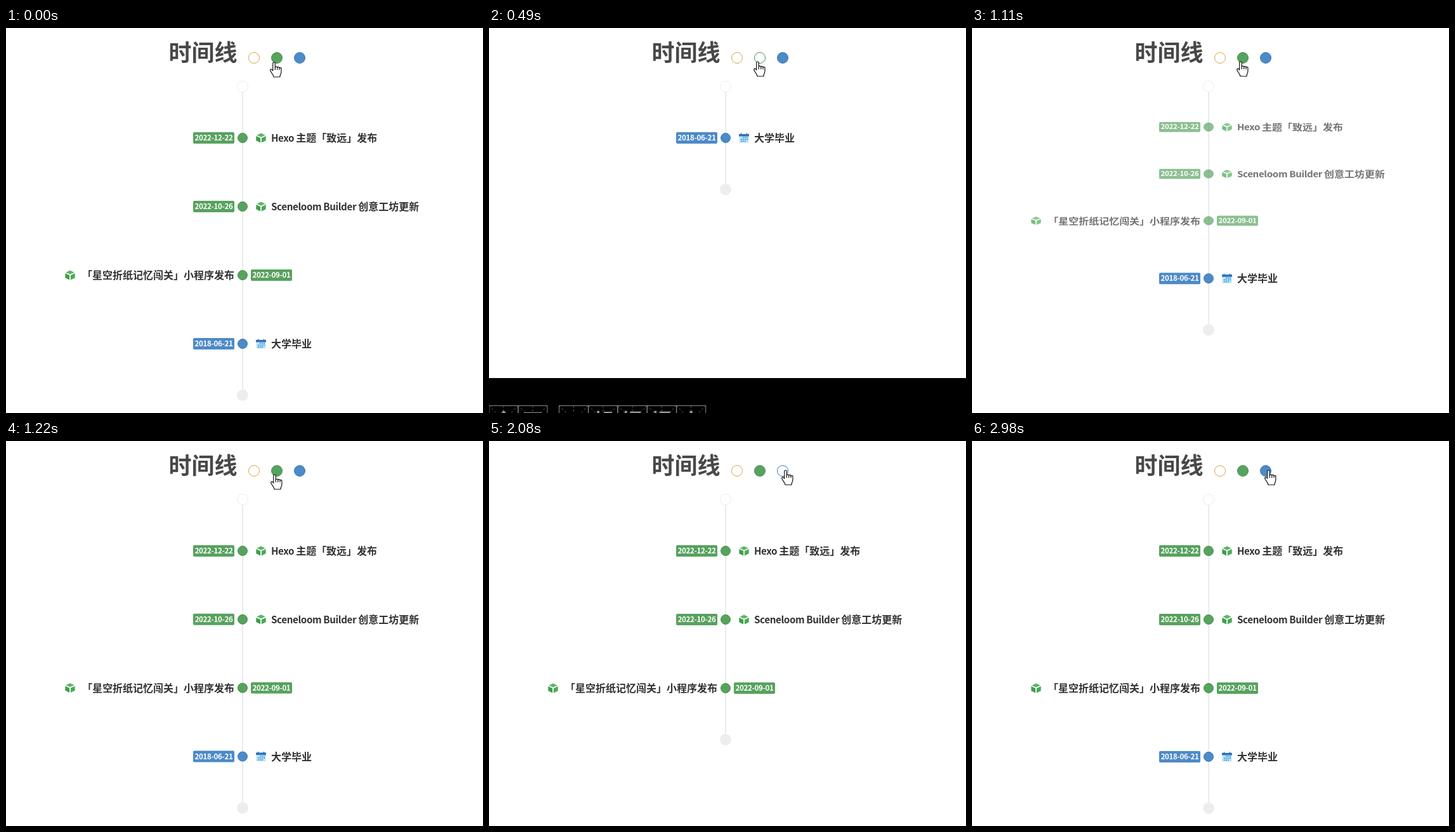
Write an HTML page that moves like this. It is 752 px wide and 606 px high and loops after 3.24 s.

```html
<!DOCTYPE html>
<html lang="zh-CN">
<head>
<meta charset="utf-8">
<style>
html, body { margin: 0; width: 100%; height: 100%; overflow: hidden; background: #fff; }
svg { display: block; }
text { font-family: "Noto Sans CJK SC", "Noto Sans CJK", "Noto Sans", sans-serif; font-weight: 700; white-space: pre; }
.label { font-size: 16px; fill: #333; }
.latin { font-size: 15.2px; letter-spacing: -.4px; }
.date { font-size: 11.6px; letter-spacing: -.35px; fill: #fff; text-anchor: middle; }
</style>
</head>
<body>
<svg id="stage" width="752" height="606" viewBox="0 0 752 606"></svg>
<script>
const LOOP = 3240, ROW = 108, TOP = 119, FADE = 200;
const GREEN = '#58a25f', BLUE = '#4d8ac8';
const GREEN_EDGE = '#3f9148', BLUE_EDGE = '#3878bb';

const items = [
  { kind: 'green', date: '2022-12-22', latin: 'Hexo ', text: '主题「致远」发布' },
  { kind: 'green', date: '2022-10-26', latin: 'Sceneloom Builder ', text: '创意工坊更新' },
  { kind: 'green', date: '2022-09-01', latin: '', text: '「星空折纸记忆闯关」小程序发布', left: true },
  { kind: 'blue', date: '2018-06-21', latin: '', text: '大学毕业' }
];

// Icons are centred on their own origin.
const cube = `
  <path d="M0-7.500 6.800-4.300 0-1.300-6.800-4.300z" fill="#5fb567"/>
  <path d="M-7.700-2.900V4.200L-.900 7.500V.200z" fill="#3f9e4b"/>
  <path d="M7.700-2.900V4.200L.900 7.500V.200z" fill="#4aa956"/>`;

const days = [-1, 2, 5].flatMap((y, r) => [-5, -2, 1, 4]
  .filter((x, c) => !(r == 0 && c == 0 || r == 2 && c == 3))
  .map(x => `<rect x="${x}" y="${y - .5}" width="1.8" height="1.6" fill="#3686c9"/>`)).join('');
const calendar = `
  <rect x="-7.5" y="-6" width="15" height="13.5" rx="1" fill="#b9e6fa"/>
  <path d="M-8-6H8V-2.5H-8z" fill="#2b70bd"/>
  <path d="M-4.5-7.5V-5M4.5-7.5V-5" stroke="#2b70bd" stroke-width="1.5"/>${days}`;

function itemMarkup({ kind, date, latin, text, left }) {
  const green = kind == 'green', color = green ? GREEN : BLUE;
  const badge = left ? 386 : 295;
  return `<g class="item">
    <rect x="${badge}" y="-9" width="65" height="18" rx="2" fill="${color}"/>
    <text class="date" x="${badge + 32.5}" y="4">${date}</text>
    <circle cx="373" r="7.5" fill="${color}" stroke="${green ? GREEN_EDGE : BLUE_EDGE}"/>
    <g transform="translate(${left ? 101 : 402})">${green ? cube : calendar}</g>
    <text class="label" x="${left ? 360 : 418}" y="6" text-anchor="${left ? 'end' : 'start'}"><tspan class="latin">${latin}</tspan>${text}</text>
  </g>`;
}

// Practice squares at the top of the footer.
const square = (x, char) => `<g transform="translate(${x} 43.5)">
  <rect width="46" height="46" fill="none" stroke="#8a8a8a"/>
  <path d="M0 0 46 46M46 0 0 46M23 0V46" stroke="#666" stroke-dasharray="3 3" fill="none"/>
  <text x="23" y="37" font-size="34" text-anchor="middle" fill="#999">${char}</text></g>`;
const footer = [...'今天'].map((c, i) => square(i * 46, c)).join('') +
  [...'一起慢慢走'].map((c, i) => square(110.5 + i * 46.3, c)).join('');

const stage = document.getElementById('stage');
stage.innerHTML = `
  <text x="256.5" y="52" font-size="36" fill="#484848">时间线</text>
  <circle cx="391" cy="47" r="8.5" fill="#fff" stroke="#dfa24c"/>
  <circle id="green" cx="427" cy="47" r="8.5" stroke="${GREEN_EDGE}"/>
  <circle id="blue" cx="463" cy="47" r="8.5" stroke="${BLUE_EDGE}"/>
  <path id="line" stroke="#ebebeb" stroke-width="2"/>
  <circle cx="373" cy="92" r="8.5" fill="#fff" stroke="#ededed"/>
  <circle id="end" cx="373" r="9" fill="#ededed"/>
  ${items.map(itemMarkup).join('')}
  <g id="footer"><rect width="752" height="700"/>${footer}</g>
  <circle id="press" r="13" fill="#ff0" fill-opacity=".55"/>
  <g id="cursor" fill="#fff" stroke="#111" stroke-width="1.2" stroke-linejoin="round">
    <path d="M-1.8 13V1.8a1.8 1.8 0 0 1 3.6 0V8a1.75 1.75 0 0 1 3.4.6a1.7 1.7 0 0 1 3.3.8a1.5 1.5 0 0 1 2.9.9V15c0 3.5-2 4-2 8H-.5c0-3-3.8-6-5.2-10c-.7-2 1.6-2.8 2.6-1.4z"/>
    <path d="M1.8 8V12M5.2 8.6V12M8.5 9.4V12" fill="none"/>
  </g>`;

const $ = id => document.getElementById(id);
const set = (el, attrs) => { for (const k in attrs) el.setAttribute(k, attrs[k]); };
const clamp = x => Math.min(1, Math.max(0, x));
const between = (t, a, b) => t >= a && t < b;
const rows = [...document.querySelectorAll('.item')];

// The standard CSS "ease" curve.
function ease(x) {
  let lo = 0, hi = 1;
  const curve = (u, a, b) => 3 * u * (1 - u) ** 2 * a + 3 * u * u * (1 - u) * b + u ** 3;
  for (let i = 0; i < 20; i++) {
    const mid = (lo + hi) / 2;
    if (curve(mid, .25, .25) < x) lo = mid; else hi = mid;
  }
  return curve(lo, .1, 1);
}

const toggles = { green: [290, 1031], blue: [1885, 2785] };
const presses = [[30, 290], [950, 1031], [1630, 1885], [2660, 2785]];

function shown(t, [hide, show]) {
  const step = start => ease(clamp((t - start) / FADE));
  return 1 - step(hide) + step(show);
}

function draw(t) {
  const open = { green: shown(t, toggles.green), blue: shown(t, toggles.blue) };
  let y = TOP;
  items.forEach(({ kind }, i) => {
    const p = open[kind], h = ROW * p;
    set(rows[i], { transform: `translate(0 ${y + h / 2}) scale(1 ${.6 + .4 * p})`, opacity: p });
    y += h;
  });
  const end = y + 27;
  set($('end'), { cy: end });
  set($('line'), { d: `M373 101V${end - 9}` });
  set($('footer'), { transform: `translate(0 ${end + 297})` });

  for (const kind in toggles) {
    const full = kind == 'green' ? GREEN : BLUE;
    set($(kind), { fill: between(t, ...toggles[kind]) ? '#fff' : full });
  }

  const move = clamp((t - 1250) / 210), m = move * move * (3 - 2 * move);
  const x = t < 30 ? 422.5 : 423.5 + 44 * m;
  const tip = (t < 30 ? 54 : 53) - 7 * m;
  set($('cursor'), { transform: `translate(${x} ${tip})` });
  const down = presses.some(span => between(t, ...span));
  set($('press'), { cx: x - .5, cy: tip + .5, visibility: down ? 'visible' : 'hidden' });
}

const start = performance.now();
function tick() {
  draw((performance.now() - start) % LOOP);
  requestAnimationFrame(tick);
}
tick();
</script>
</body>
</html>
```
